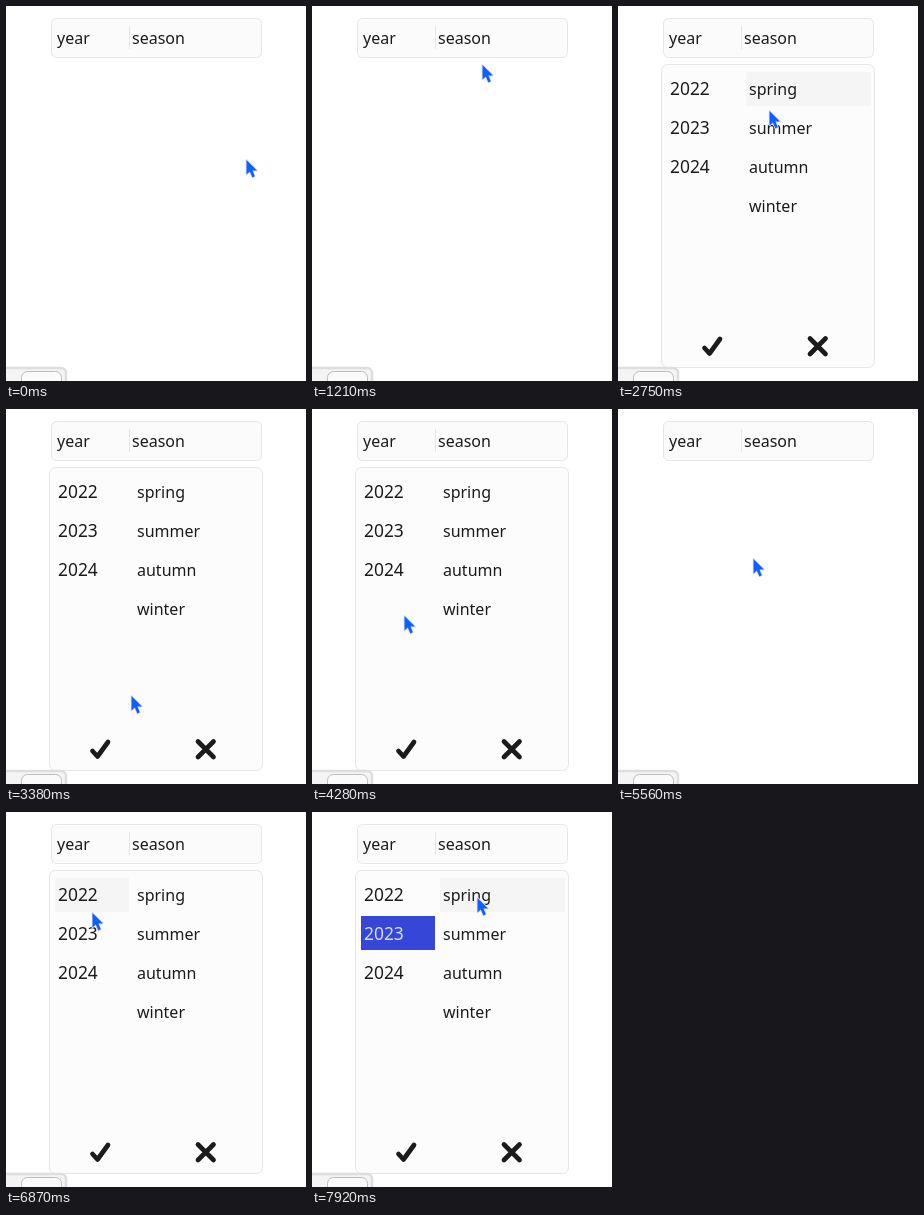
An HTML page with a canvas for the animation above (7.99 s loop, 300 by 375 pixels).

```html
<!DOCTYPE html>
<html>
<head>
<meta charset="utf-8">
<style>
html, body { margin: 0; width: 100%; height: 100%; overflow: hidden; background: #fff; }
canvas { display: block; width: 300px; height: 375px; }
</style>
</head>
<body>
<canvas id="stage" width="300" height="375"></canvas>
<script>
const ctx = document.getElementById('stage').getContext('2d');
const LOOP = 7990;
const STEP = 70;
const ROW = 39;
const INK = '#1b1b1b';
const EDGE = '#e6e6e6';

const COLUMNS = [
  { x: 52, left: 49, width: 74, size: 17.4, items: ['2022', '2023', '2024'] },
  { x: 131, left: 128, width: 125, size: 16, items: ['spring', 'summer', 'autumn', 'winter'] }
];

const HOME = { x: 240, y: 153 };
// Each glide bends towards `via` and stops at `to`
const GLIDES = [
  { start: 650, end: 1420, via: { x: 185, y: 70 }, to: { x: 153, y: 40 } },
  { start: 1490, end: 1490, to: { x: 154, y: 41 } },
  { start: 2690, end: 3450, via: { x: 146, y: 242 }, to: { x: 121, y: 296 } },
  { start: 3520, end: 3980, via: { x: 112, y: 310 }, to: { x: 80, y: 120 } },
  { start: 4050, end: 4280, to: { x: 92, y: 206 } },
  { start: 4350, end: 4690, to: { x: 192, y: 334 } },
  { start: 5290, end: 5980, via: { x: 115, y: 85 }, to: { x: 102, y: 36 } },
  { start: 6660, end: 7010, via: { x: 101, y: 95 }, to: { x: 67, y: 121 } },
  { start: 7370, end: 7920, via: { x: 218, y: 60 }, to: { x: 165, y: 85 } }
];

const clamp = v => Math.max(0, Math.min(1, v));
const mix = (a, b, u) => a + (b - a) * u;
const blend = (a, b, u) => ({ x: mix(a.x, b.x, u), y: mix(a.y, b.y, u) });

// The pointer advances in held steps, the first one at `start`
function stepped(t, start, end) {
  const gaps = Math.round((end - start) / STEP);
  const done = Math.floor(gaps * (t - start) / (end - start || 1) + 0.2);
  return clamp((done + 1) / (gaps + 1));
}

function pointerAt(t) {
  let from = HOME;
  for (const { start, end, via, to } of GLIDES) {
    if (t < start) break;
    const u = stepped(t, start, end);
    const bend = via || blend(from, to, 0.5);
    const spot = blend(blend(from, bend, u), blend(bend, to, u), u);
    if (t < end) return { x: Math.round(spot.x), y: Math.round(spot.y) };
    from = to;
  }
  return from;
}

const inside = (p, x, y, w, h) => p.x >= x && p.x < x + w && p.y >= y && p.y < y + h;

function box(x, y, w, h, r, fill, edge, line = 1) {
  ctx.beginPath();
  ctx.roundRect(x, y, w, h, r);
  ctx.fillStyle = fill;
  ctx.fill();
  ctx.strokeStyle = edge;
  ctx.lineWidth = line;
  ctx.stroke();
}

function bar(x, y, w, h, fill) {
  ctx.fillStyle = fill;
  ctx.fillRect(x, y, w, h);
}

function label(text, x, y, size, color = INK) {
  ctx.font = `${size}px "Noto Sans", "Open Sans", sans-serif`;
  ctx.fillStyle = color;
  ctx.fillText(text, x, y);
}

function icon(path, color) {
  ctx.lineWidth = 4.7;
  ctx.strokeStyle = color;
  ctx.lineCap = ctx.lineJoin = 'round';
  ctx.stroke(new Path2D(path));
}

function drawHeader(tip) {
  const hover = inside(tip, 45, 12, 211, 40);
  box(45.5, 12.5, 210, 39, 5, hover ? '#f5f5f5' : '#fbfbfb', EDGE);
  bar(123, 20, 1, 23, EDGE);
  label('year', 51, 38, 16);
  label('season', 126, 38, 16);
}

function drawColumn({ x, left, width, size, items }, tip, picked) {
  items.forEach((item, i) => {
    const top = 66 + i * ROW;
    const chosen = item === '2023' ? picked : 0;
    if (inside(tip, left, top, width, ROW)) bar(left, top, width, 34, '#f5f5f5');
    if (chosen) bar(left, top - 1, width, 34, `rgba(53, 70, 216, ${chosen})`);
    label(item, x, top + 23, size, chosen > 0.5 ? '#d9def8' : INK);
  });
}

function drawPanel(t, tip) {
  if (t < 1950 || (t >= 5020 && t < 6240)) return;
  const shown = clamp((t - (t < 6240 ? 1950 : 6240)) / 540);
  const picked = clamp((t - 7010) / 210);
  const pressed = t >= 4890 && t < 5020;
  ctx.save();
  ctx.globalAlpha = shown;
  ctx.translate(0, -60 * clamp(1 - shown / 0.4));
  box(43.5, 58.5, 213, 303, 6, '#fcfcfc', EDGE);
  COLUMNS.forEach(column => drawColumn(column, tip, picked));
  icon('M86.5 342 L91.5 347.5 L102 333', INK);
  icon('M192 332.5 l15.5 15.5 m0 -15.5 l-15.5 15.5', pressed ? '#777' : INK);
  ctx.restore();
}

function drawCorner() {
  box(-10, 362, 70, 30, 5, '#f4f4f4', '#dedede', 2.5);
  box(15.5, 365.5, 40, 30, 6, '#fafafa', '#bdbdbd');
}

function drawPointer(tip) {
  const arrow = new Path2D('M0.5 0.5 V15 L3.8 12.2 L6.4 18 L8.8 16.9 L6.4 11.2 L11 11 Z');
  ctx.save();
  ctx.translate(tip.x, tip.y + 0.4);
  ctx.lineJoin = 'round';
  ctx.lineWidth = 1.6;
  ctx.strokeStyle = '#d5e0f5';
  ctx.stroke(arrow);
  ctx.fillStyle = '#0f5fff';
  ctx.fill(arrow);
  ctx.restore();
}

function render(t) {
  const tip = pointerAt(t);
  bar(0, 0, 300, 375, '#fff');
  drawHeader(tip);
  drawPanel(t, tip);
  drawCorner();
  drawPointer(tip);
}

const began = performance.now();
function tick() {
  render((performance.now() - began) % LOOP);
  requestAnimationFrame(tick);
}
tick();
</script>
</body>
</html>
```
